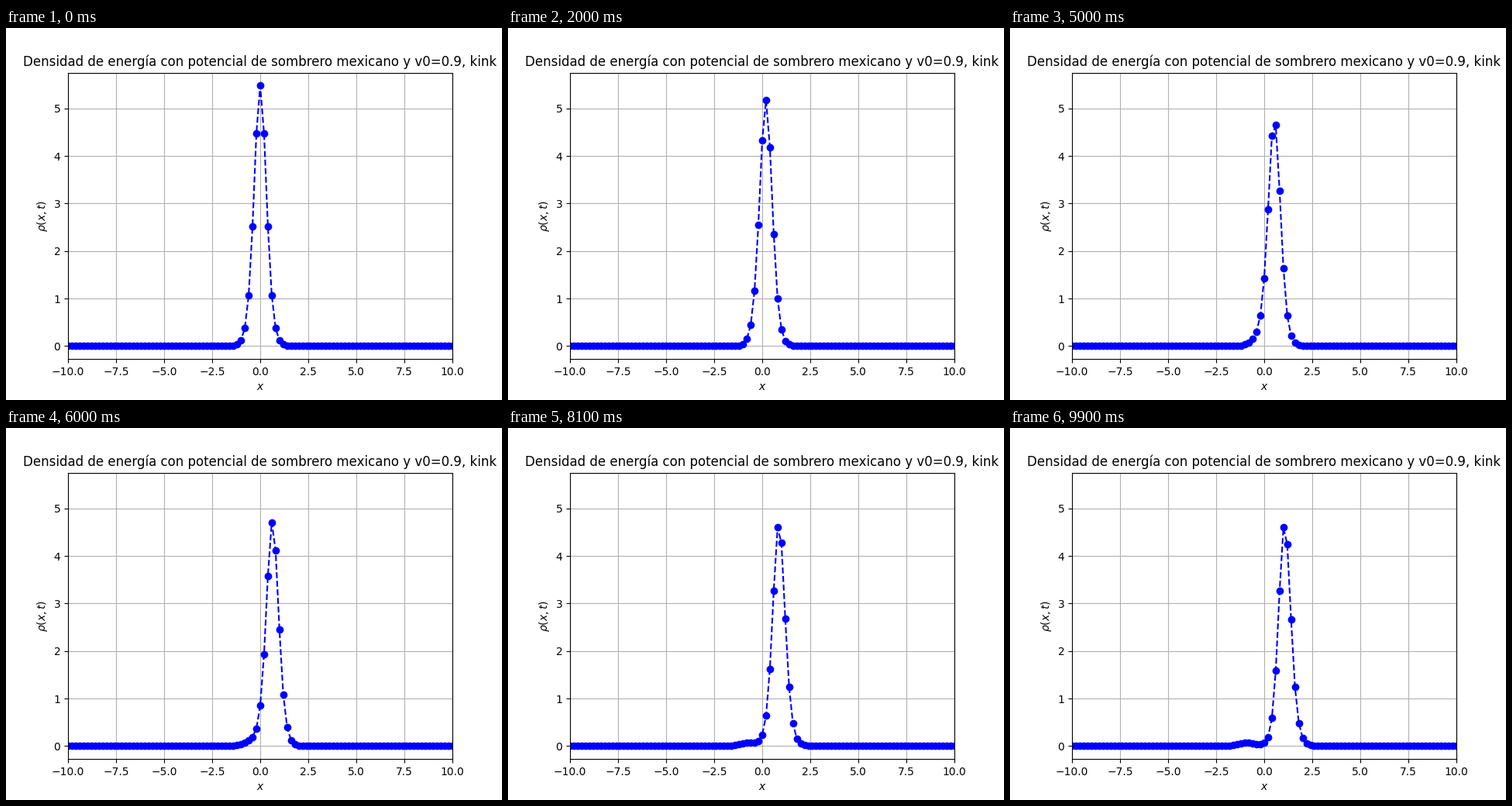
Recreate the animation shown at these times as a matplotlib script. Size 640x480 px, loop 10 s.

```python
import numpy as np
import matplotlib.pyplot as plt
from matplotlib.animation import FuncAnimation

FRAMES = 100
INTERVAL = 100  # ms

x = np.linspace(-10, 10, 101)


def sech2(w):
    return 1 / np.cosh(w) ** 2


def density(n):
    """Energy density: a fast right-moving kink, a faint left-moving
    ripple and the cross term that fades as the two separate."""
    u = x - (0.0105 * n + 2.3e-6 * n**2)
    skew = 0.08 * (n / 99) ** 3
    right = sech2((1.61 + 0.0003 * n) * u - skew * u**2)
    left = sech2((1.61 - 4e-5 * n**2) * (x + 0.0092 * n))
    cross = 0.728 - 0.0036 * n
    return 4.68 * right**2 + cross * right * left + 0.07 * left**2


fig, ax = plt.subplots(figsize=(6.4, 4.8), dpi=100)
line, = ax.plot(x, density(0), color="blue", linestyle="--", marker="o")
ax.set_xlim(-10, 10)
ax.set_ylim(-0.274, 5.752)
ax.set_xlabel("$x$")
ax.set_ylabel(r"$\rho(x,t)$")
ax.set_title("Densidad de energía con potencial de sombrero mexicano y v0=0.9, kink")
ax.grid(True)


def update(n):
    line.set_ydata(density(n))
    return line,


anim = FuncAnimation(fig, update, frames=FRAMES, interval=INTERVAL,
                     repeat=True, repeat_delay=0)
plt.show()
```
